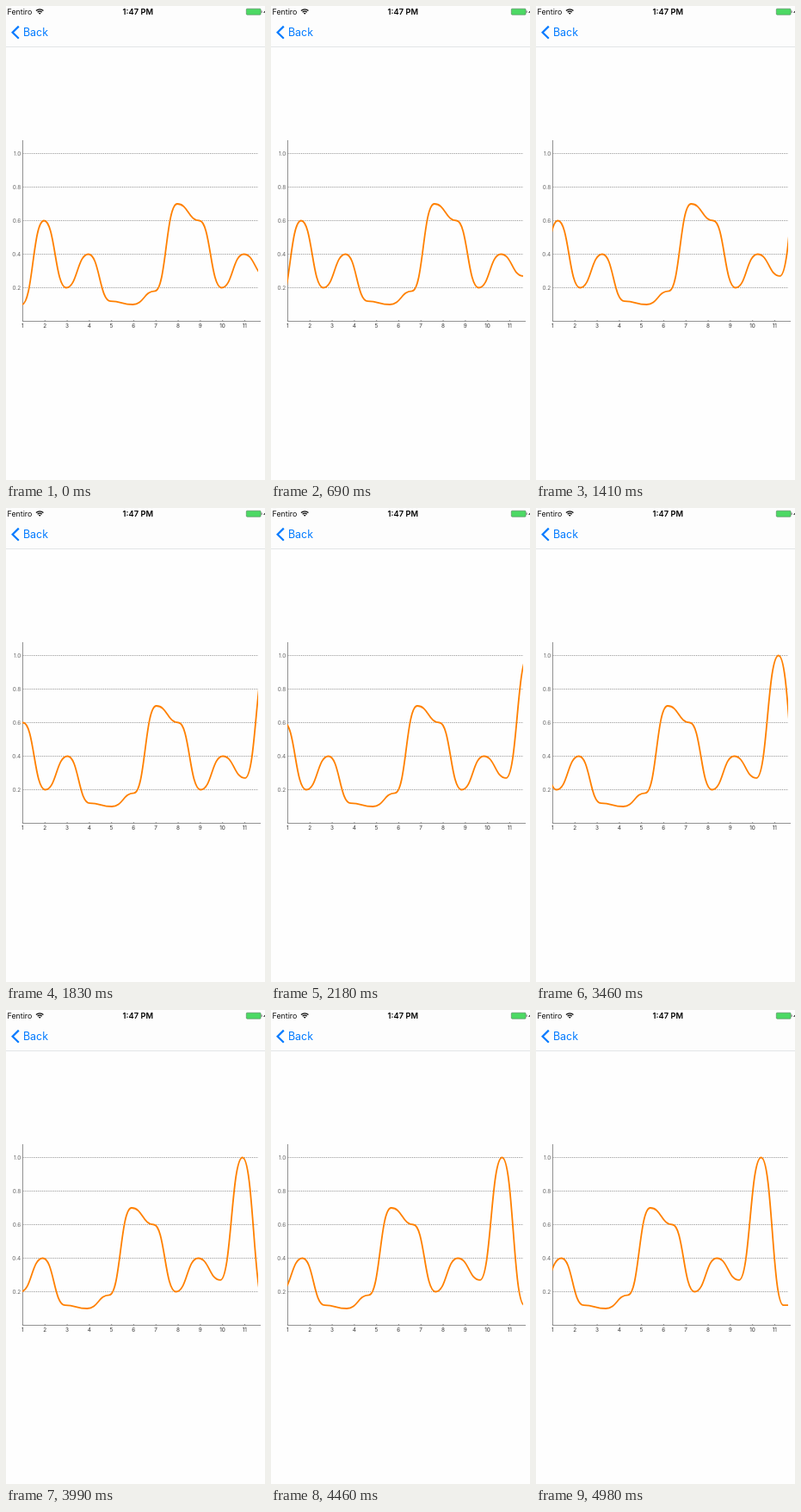
Recreate the animation shown at these times as an HTML page with a canvas. Size 301 px wide and 551 px high, loop 5080 ms.

```html
<!DOCTYPE html>
<html lang="en">
<head>
<meta charset="utf-8">
<title>Scrolling line chart</title>
<style>
html, body { margin: 0; width: 100%; height: 100%; overflow: hidden; background: #fefefe; }
canvas { display: block; width: 301px; height: 551px; }
</style>
</head>
<body>
<canvas></canvas>
<script>
const W = 301, H = 551, LOOP = 5080;
const LEFT = 19.5, RIGHT = 293, BASE = 366.5, STEP = 25.8, UNIT = 195;
const SPEED = 0.0133, START = 1.15;
const values = [.1, .6, .2, .4, .12, .1, .18, .7, .6, .2, .4, .27, 1, .12, .12];
// Bursts of evenly spaced updates: first time, last time, count.
const bursts = [
  [60, 570, 10], [630, 1110, 9], [1170, 1650, 9], [1710, 2180, 9], [2240, 2760, 10],
  [2820, 3340, 10], [3400, 3870, 9], [3930, 4400, 9], [4460, 4980, 9]
];
const ticks = [0, ...bursts.flatMap(([from, to, n]) =>
  Array.from({ length: n }, (_, i) => Math.round((from + (to - from) * i / (n - 1)) / 10) * 10))];

const canvas = document.querySelector('canvas');
const ctx = canvas.getContext('2d');
const ratio = window.devicePixelRatio || 1;
canvas.width = W * ratio;
canvas.height = H * ratio;
ctx.scale(ratio, ratio);

const valueY = v => BASE - v * UNIT;

function line(points, color, width, dash = []) {
  ctx.beginPath();
  points.forEach(([x, y]) => ctx.lineTo(x, y));
  ctx.strokeStyle = color;
  ctx.lineWidth = width;
  ctx.setLineDash(dash);
  ctx.stroke();
  ctx.setLineDash([]);
}

function text(str, x, y, size, color, align = 'left', weight = 400) {
  ctx.font = `${weight} ${size}px Inter, sans-serif`;
  ctx.textAlign = align;
  ctx.fillStyle = color;
  ctx.fillText(str, x, y);
}

function drawWifi(x, y) {
  const spread = Math.PI / 4, up = -Math.PI / 2;
  ctx.strokeStyle = '#111';
  ctx.lineWidth = 1.3;
  for (const r of [3.6, 6]) {
    ctx.beginPath();
    ctx.arc(x, y, r, up - spread, up + spread);
    ctx.stroke();
  }
  ctx.fillStyle = '#111';
  ctx.beginPath();
  ctx.moveTo(x, y);
  ctx.arc(x, y, 2, up - spread, up + spread);
  ctx.fill();
}

function drawBattery() {
  ctx.beginPath();
  ctx.roundRect(279.3, 3.2, 16.8, 7, 1);
  ctx.fillStyle = '#4cd964';
  ctx.fill();
  ctx.strokeStyle = '#55805e';
  ctx.lineWidth = 0.6;
  ctx.stroke();
  ctx.fillStyle = '#555';
  ctx.fillRect(296.6, 5.5, 0.9, 2.4);
  line([[301, 6], [299.6, 7.4], [301, 7.4]], '#222', 0.8);
}

function drawBars() {
  ctx.fillStyle = '#fdfdfd';
  ctx.fillRect(0, 0, W, 47);
  ctx.fillStyle = '#dcdfe1';
  ctx.fillRect(0, 47, W, 0.8);
  text('Fentiro', 1.5, 10, 8.9, '#111');
  drawWifi(39.2, 9.8);
  text('1:47 PM', 153.3, 10, 9.3, '#000', 'center', 600);
  drawBattery();
  line([[14.8, 23.6], [7.6, 30.7], [14.8, 37.8]], '#007aff', 2.2);
  text('Back', 20, 35.2, 12.4, '#007aff');
}

function drawAxes() {
  for (let i = 1; i <= 5; i++) {
    const v = i / 5, y = valueY(v);
    line([[LEFT, y], [RIGHT, y]], '#777', 0.75, [1.11, 1.11]);
    text(v.toFixed(1), 17.2, y + 2.4, 6.4, '#666', 'right');
  }
  line([[LEFT, 156], [LEFT, BASE], [296, BASE]], '#777', 0.8);
  for (let i = 0; i < 11; i++) {
    const x = LEFT + i * STEP;
    line([[x, BASE - 1.5], [x, BASE]], '#777', 0.75);
    text(i + 1, x - 0.2, 374, 6.4, '#333', 'center');
  }
}

function drawCurve(shift) {
  ctx.save();
  ctx.beginPath();
  ctx.rect(19, 150, RIGHT - 19, 220);
  ctx.clip();
  ctx.beginPath();
  values.forEach((v, i) => {
    const x = LEFT + i * STEP - shift, y = valueY(v);
    if (!i) return ctx.moveTo(x, y);
    const mid = x - STEP / 2;
    ctx.bezierCurveTo(mid, valueY(values[i - 1]), mid, y, x, y);
  });
  ctx.strokeStyle = '#ff8000';
  ctx.lineWidth = 1.8;
  ctx.stroke();
  ctx.restore();
}

function render(now) {
  const time = now % LOOP;
  const tick = ticks.findLast(t => t <= time);
  ctx.fillStyle = '#fefefe';
  ctx.fillRect(0, 0, W, H);
  drawBars();
  drawAxes();
  drawCurve(START + tick * SPEED);
}

function frame() {
  render(performance.now());
  requestAnimationFrame(frame);
}
frame();
</script>
</body>
</html>
```
